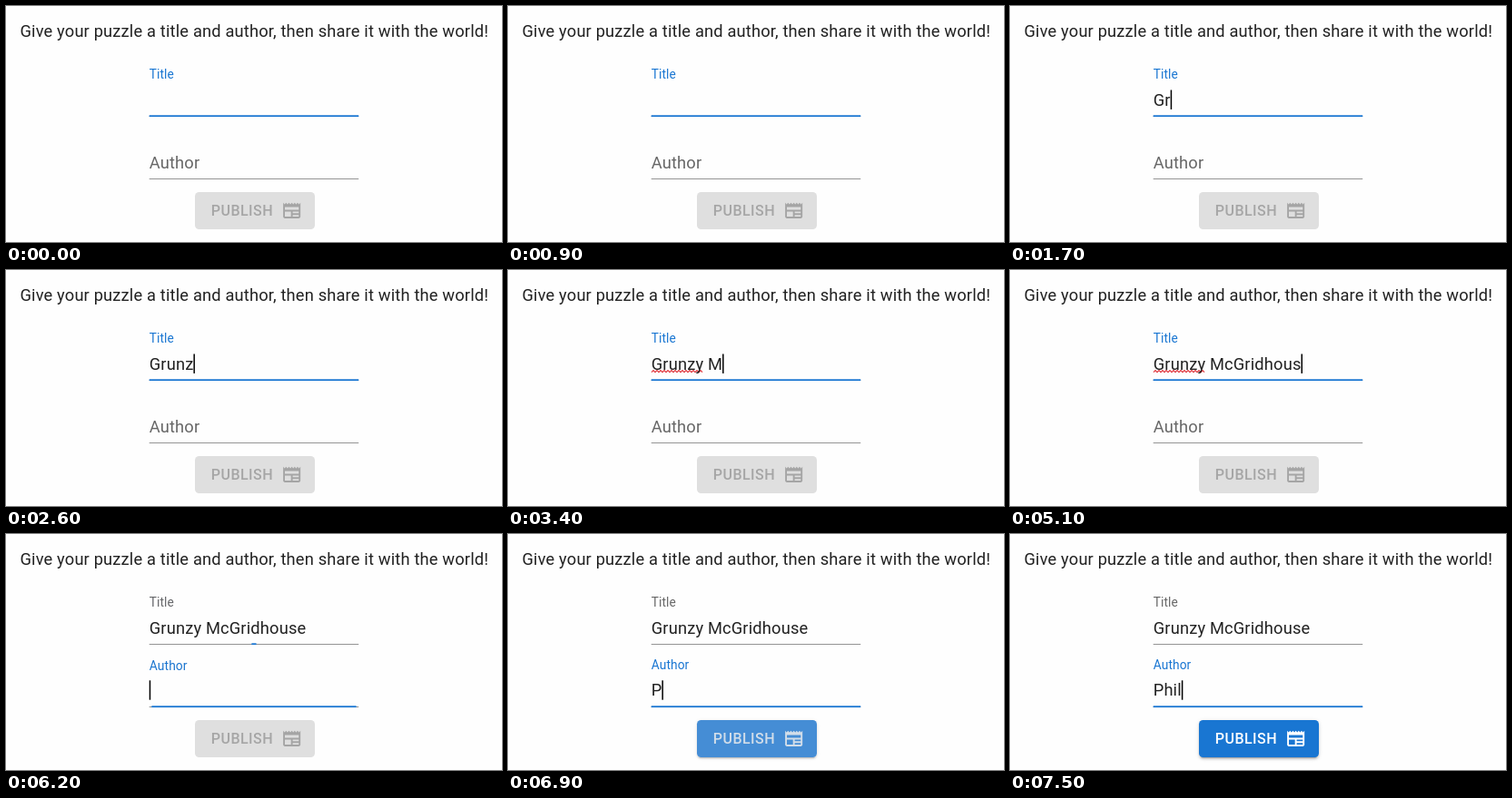
Animation of 546x260 px, one loop 8 s. Source, as an HTML page:

```html
<!DOCTYPE html>
<html lang="en">
<head>
<meta charset="utf-8">
<title>Publish form</title>
<style>
  html, body { margin: 0; width: 100%; height: 100%; overflow: hidden; background: #fefefe; }
  #button { position: absolute; left: 207.5px; top: 204.7px; width: 132px; height: 41.5px; border-radius: 4.6px; }
  svg { position: absolute; left: 0; top: 0; }
  text { font: 18.286px Roboto, sans-serif; letter-spacing: .00938em; white-space: pre; fill: rgba(0, 0, 0, .87); }
  #publish text { font-size: 16px; font-weight: 500; letter-spacing: .02857em; fill: inherit; }
  .rule { fill: rgba(0, 0, 0, .42); }
  .focus { fill: #1976d2; }
</style>
</head>
<body>
<div id="button"></div>
<svg width="546" height="260" viewBox="0 0 546 260">
  <text x="273.3" y="34" text-anchor="middle">Give your puzzle a title and author, then share it with the world!</text>

  <text id="titleLabel" transform="translate(157.7 80.2) scale(.75)">Title</text>
  <path id="squiggle" fill="none" stroke="#e0363c" stroke-width="1.2"/>
  <text id="title" x="157.7" y="109.6"></text>
  <rect class="rule" x="157.7" y="121" width="230.5" height="1"/>
  <rect class="focus" id="titleLine" y="120.3" height="1.8"/>

  <text id="authorLabel">Author</text>
  <text id="author" x="157.7" y="178.4"></text>
  <rect class="rule" x="157.7" y="190" width="230.5" height="1"/>
  <rect class="focus" id="authorLine" y="189.3" height="1.8"/>

  <rect id="caret" width="1.5" height="21.4"/>

  <g id="publish">
    <text x="225.8" y="230.8">PUBLISH</text>
    <path transform="translate(303.2 214) scale(.9524)" d="m22 3-1.67 1.67L18.67 3 17 4.67 15.33 3l-1.66 1.67L12 3l-1.67 1.67L8.67 3 7 4.67 5.33 3 3.67 4.67 2 3v16c0 1.1.9 2 2 2h16c1.1 0 2-.9 2-2V3zM11 19H4v-6h7v6zm9 0h-7v-2h7v2zm0-4h-7v-2h7v2zm0-4H4V8h16v3z"/>
  </g>
</svg>
<script>
const LOOP = 8000, STEP = 100, LEFT = 157.7, WIDTH = 230.5;
const BLUE = '#1976d2', GREY = 'rgb(0 0 0 / .6)';
const FOCUS_AUTHOR = 6100;

const title = {
  text: 'Grunzy McGridhouse',
  keys: [1300, 1700, 1900, 2200, 2600, 2900, 3100, 3400, 3700, 4000,
         4300, 4300, 4500, 4600, 4800, 4900, 5100, 5400]
};
const author = { text: 'Phil', keys: [6800, 7100, 7300, 7500] };
const caretResets = [400, FOCUS_AUTHOR, ...title.keys, ...author.keys];

const $ = id => document.getElementById(id);
const set = (id, attrs) => {
  for (const name in attrs) $(id).setAttribute(name, attrs[name]);
};
const mix = (from, to, p) => `color-mix(in srgb, ${to} ${p * 100}%, ${from})`;

// CSS-style cubic Bézier easing, solved by bisection
function bezier(x1, y1, x2, y2) {
  const curve = (a, b, u) => 3 * a * u * (1 - u) ** 2 + 3 * b * u * u * (1 - u) + u ** 3;
  return x => {
    if (x <= 0) return 0;
    if (x >= 1) return 1;
    let lo = 0, hi = 1;
    for (let i = 0; i < 24; i++) {
      const mid = (lo + hi) / 2;
      if (curve(x1, x2, mid) < x) lo = mid; else hi = mid;
    }
    return curve(y1, y2, lo);
  };
}
const easeOut = bezier(0, 0, .2, 1);
const easeInOut = bezier(.4, 0, .2, 1);

const typed = (field, t) => field.text.slice(0, field.keys.filter(k => k <= t).length);

function drawLine(id, scale) {
  set(id, { x: LEFT + WIDTH * (1 - scale) / 2, width: WIDTH * scale });
}

function drawCaret(t) {
  const inAuthor = t >= FOCUS_AUTHOR;
  const last = Math.max(...caretResets.filter(k => k <= t));
  set('caret', {
    x: LEFT + $(inAuthor ? 'author' : 'title').getComputedTextLength(),
    y: inAuthor ? 161.3 : 92.5,
    visibility: t - last < 500 ? 'visible' : 'hidden'
  });
}

function drawButton(p) {
  const shadow = (y, blur, spread, alpha) =>
    `0 ${y * p}px ${blur * p}px ${spread * p}px rgb(0 0 0 / ${alpha * p})`;
  $('button').style.background = mix('rgb(0 0 0 / .12)', BLUE, p);
  $('button').style.boxShadow =
    [shadow(3.4, 1.1, -2.3, .2), shadow(2.3, 2.3, 0, .14), shadow(1.1, 5.7, 0, .12)].join();
  $('publish').style.fill = mix('rgb(0 0 0 / .26)', '#fff', p);
}

function draw(t) {
  const shift = easeOut((t - 6040) / 200);
  $('title').textContent = typed(title, t);
  $('author').textContent = typed(author, t);
  $('titleLabel').style.fill = mix(BLUE, GREY, shift);
  $('authorLabel').style.fill = mix(GREY, BLUE, shift);
  set('authorLabel', {
    transform: `translate(${LEFT} ${178.6 - 29.4 * shift}) scale(${1 - .25 * shift})`
  });
  drawLine('titleLine', 1 - shift);
  drawLine('authorLine', shift);
  set('squiggle', { visibility: t >= 3100 && t < FOCUS_AUTHOR ? 'visible' : 'hidden' });
  drawCaret(t);
  drawButton(easeInOut((t - 6775) / 250));
}

function tick() {
  const t = performance.now() % LOOP;
  draw(Math.floor(t / STEP) * STEP);
  requestAnimationFrame(tick);
}

set('squiggle', { d: 'M158 112.6' + 'l2-2 2 2'.repeat(14) });
tick();
</script>
</body>
</html>
```
